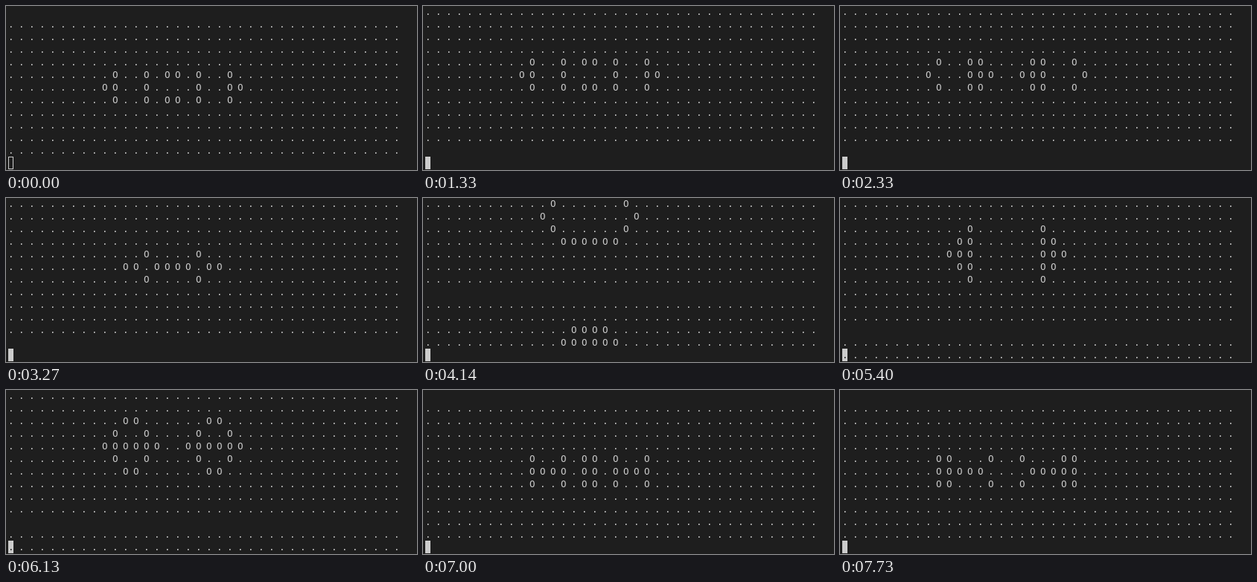
Recreate the animation shown at these times as an HTML page with a canvas. Size 552 by 221 pixels, loop 8000 ms.

```html
<!DOCTYPE html>
<html>
<head>
<meta charset="utf-8">
<style>
  html, body { margin: 0; height: 100%; overflow: hidden; background: #1e1e1e; }
  canvas { display: block; }
</style>
</head>
<body>
<canvas id="screen" width="552" height="221"></canvas>
<script>
const ctx = document.getElementById('screen').getContext('2d');
const BG = '#1e1e1e', FG = '#cccccc';
const COLS = 38, ROWS = 11, LINES = 13, LINE_HEIGHT = 17;
const LOOP = 8000, FOCUS = 400, PRINT_TIME = 70;

// Each print: start time, lines scrolled midway, whether the cursor line already holds text
const prints = [
  [1330, 1, 0], [1860, 6, 1], [2330, 1, 0], [2800, 2, 1],
  [3270, 1, 0], [3670, 2, 1], [4140, 5, 0], [4470, 2, 1],
  [5000, 2, 1], [5400, 2, 1], [5800, 2, 1], [6130, 2, 1],
  [6530, 1, 0], [6930, 6, 1], [7330, 6, 1], [7660, 1, 0]
];

const makeGrid = rule => Array.from({ length: ROWS }, (_, y) =>
  Array.from({ length: COLS }, (_, x) => rule(x, y)));

// Conway's Game of Life
const evolve = grid => makeGrid((x, y) => {
  let total = 0;
  for (let dy = -1; dy <= 1; dy++)
    for (let dx = -1; dx <= 1; dx++) total += grid[y + dy]?.[x + dx] ? 1 : 0;
  return total === 3 || (total === 4 && grid[y][x]);
});

const outer = [10, 13, 15, 16, 18, 21], middle = [9, 10, 13, 18, 21, 22];
const seed = { 4: outer, 5: middle, 6: outer };
const generations = [makeGrid((x, y) => !!seed[y]?.includes(x))];
for (let i = 0; i < prints.length; i++) generations.push(evolve(generations[i]));

function drawCursor(focused) {
  ctx.fillStyle = ctx.strokeStyle = FG;
  if (focused) ctx.fillRect(3, 203, 7, 17);
  else ctx.strokeRect(3.5, 203.5, 6, 16);
}

function draw(t) {
  const done = prints.filter(([start]) => t >= start + PRINT_TIME).length;
  const [start, lines, typed] = prints[done] || [LOOP, 0, 0];
  const scroll = t >= start ? lines : 0;
  const buffer = [[], ...generations[done], [], ...(generations[done + 1] || [])];

  ctx.fillStyle = BG;
  ctx.fillRect(0, 0, 552, 221);
  drawCursor(t >= FOCUS);

  ctx.font = '12.5px "DejaVu Sans Mono", monospace';
  ctx.textAlign = 'center';
  for (let line = 0; line < LINES; line++) {
    const onCursor = line === LINES - 1;
    if (onCursor && !(scroll && typed)) continue;
    buffer[line + scroll].forEach((alive, x) => {
      ctx.fillStyle = onCursor && x === 0 ? BG : FG;
      ctx.fillText(alive ? 'O' : '.', 6.85 + x * 14, 12 + line * LINE_HEIGHT);
    });
  }
}

const origin = performance.now();
function tick() {
  draw((performance.now() - origin) % LOOP);
  requestAnimationFrame(tick);
}
tick();
</script>
</body>
</html>
```
